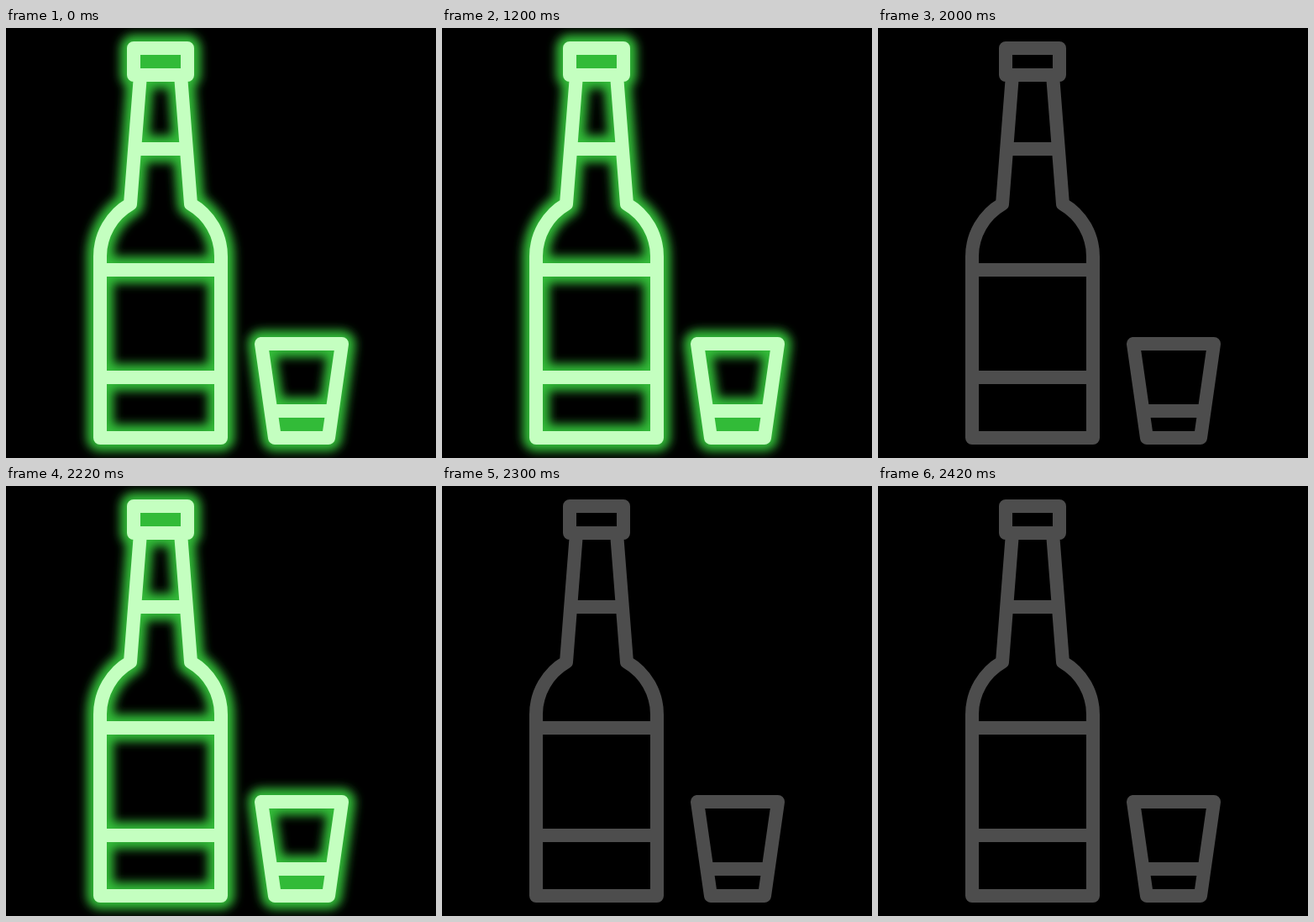
An HTML page that plays this animation: 512 by 512 pixels, repeating every 2500 ms.

```html
<!DOCTYPE html>
<html lang="en">
<head>
<meta charset="utf-8">
<title>Neon bottle and glass</title>
<style>
  html, body { margin: 0; height: 100%; overflow: hidden; background: #000; }
  svg { display: block; width: 100%; height: 100%; }
  use { fill: none; stroke-linecap: round; stroke-linejoin: round; }
  #glow { stroke: #33bb38; stroke-width: 32; filter: url(#blur); }
  #tube { stroke: #4d4d4d; stroke-width: 16; }
  .on #tube { stroke: #c4ffc0; }
  svg:not(.on) #glow { display: none; }
</style>
</head>
<body>
<svg id="sign" class="on" viewBox="0 0 512 512">
  <defs>
    <filter id="blur" filterUnits="userSpaceOnUse" x="0" y="0" width="512" height="512">
      <feGaussianBlur stdDeviation="6"/>
    </filter>
    <path id="shape" d="M152 24H216V56H152Z
      M160 56L148 209.6A72 72 0 0 0 112 272V488H256V272A72 72 0 0 0 220 209.6L208 56
      M154 144H214M112 288H256M112 416H256
      M304 376H400L384 488H320ZM316 456H388"/>
  </defs>
  <use id="glow" href="#shape"/>
  <use id="tube" href="#shape"/>
</svg>
<script>
  const sign = document.getElementById('sign');

  // Lit, then two short blackouts per loop
  function draw() {
    const t = performance.now() % 2500;
    const lit = t < 2000 || (t >= 2100 && t < 2300);
    sign.classList.toggle('on', lit);
    requestAnimationFrame(draw);
  }
  draw();
</script>
</body>
</html>
```
